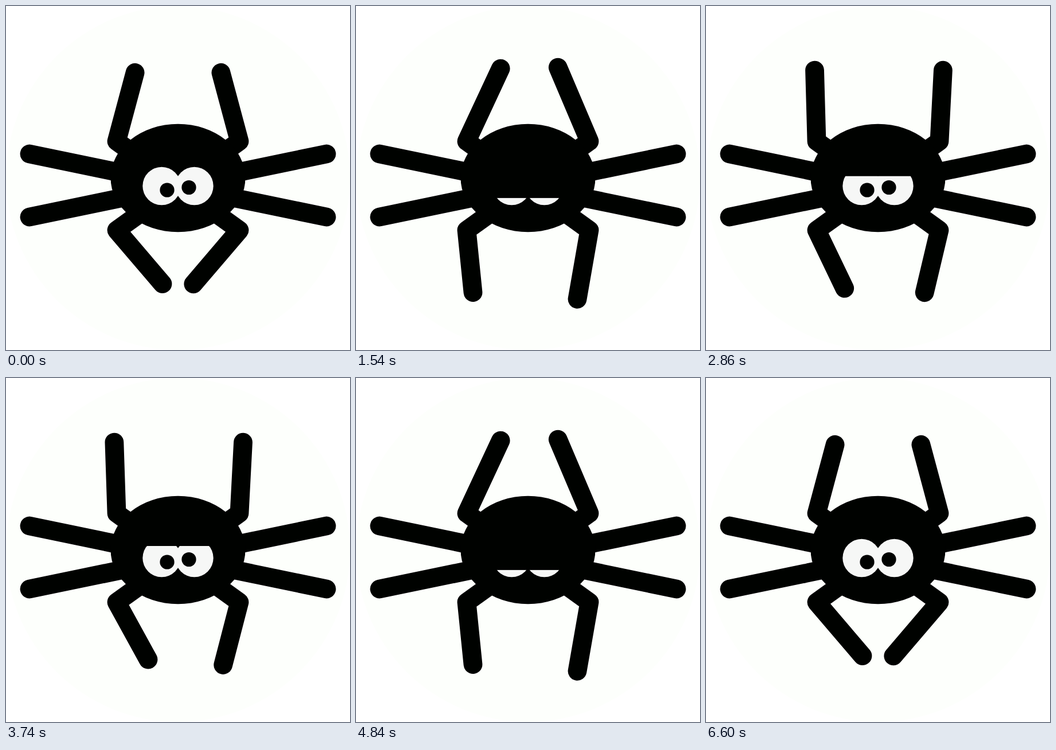
Recreate the animation shown at these times as an HTML page. Size 600x600 px, loop 6.82 s.

```html
<!DOCTYPE html>
<html lang="en">
<head>
<meta charset="utf-8">
<title>Sleepy spider</title>
<style>
html, body { margin: 0; width: 100%; height: 100%; overflow: hidden; background: #fff; }
svg { display: block; width: 100vw; height: 100vh; }
</style>
</head>
<body>
<svg viewBox="0 0 600 600">
  <circle cx="300" cy="300" r="300" fill="#fdfffc"/>
  <g fill="none" stroke="#000200" stroke-width="32.8" stroke-linecap="round" stroke-linejoin="round">
    <path d="M41 258L300 311.7L559 258M41 368L300 314.5L559 368"/>
    <path id="legs"/>
  </g>
  <ellipse cx="300" cy="300" rx="117.5" ry="94.2" fill="#000200"/>
  <g fill="#f6f7f6">
    <circle cx="271.5" cy="314" r="33.2"/>
    <circle cx="328.5" cy="314" r="33.2"/>
  </g>
  <g fill="#000200">
    <circle cx="281" cy="321" r="12.6"/>
    <circle cx="319" cy="316.5" r="12.6"/>
    <rect id="lid" x="230" y="260" width="140" height="18"/>
  </g>
</svg>
<script>
const STEP = 220, STEPS = 31, CYCLE = 15;
const MID = 300, RAD = Math.PI / 180;
const legPath = document.getElementById('legs');
const lid = document.getElementById('lid');

const bowl = (base, gain, low) => p => base + gain * (p - low) ** 2;
const reach = p => 124 + 2 * Math.max(0, p - 5) ** 3;

// side: -1 left, 1 right; dir: -1 up, 1 down
// turns: inward tilt of the shin in degrees at each key phase
const keys = [0, 2, 4, 5, 7, 8];
const legs = [
  { side: -1, dir: -1, size: reach, turns: [15, -1.9, -0.7, 4.2, 25, 28] },
  { side: 1, dir: -1, size: reach, turns: [15, -3, -2.8, 13.7, 23, 26] },
  { side: -1, dir: 1, size: bowl(108, 0.5, 5.5), turns: [40.5, 28.8, 16.2, 31, 5.8, 3] },
  { side: 1, dir: 1, size: bowl(110.5, 1, 3.6), turns: [40.5, 14.5, 9.9, 26.8, 9.9, 22] }
];

function mix(values, p) {
  const i = Math.max(1, keys.findIndex(k => k >= p));
  const k = (p - keys[i - 1]) / (keys[i] - keys[i - 1]);
  return values[i - 1] + (values[i] - values[i - 1]) * k;
}

// Out to phase 8, back again, with a quicker last stretch
function phaseAt(n) {
  if (n <= 8) return n;
  return n <= 11 ? 16 - n : (CYCLE - n) * 1.25;
}

function legAt({ side, dir, size, turns }, p) {
  const angle = mix(turns, p) * RAD, len = size(p);
  const kneeX = MID + side * 107, kneeY = 313.5 + dir * 77.5;
  const footX = kneeX - side * len * Math.sin(angle);
  const footY = kneeY + dir * len * Math.cos(angle);
  return `M${MID + side * 50} ${kneeY - dir * 41}L${kneeX} ${kneeY}L${footX} ${footY}`;
}

function draw(ms) {
  const step = Math.floor(ms / STEP) % STEPS;
  const p = phaseAt(step % CYCLE);
  lid.setAttribute('height', 18 + 7.5 * p + 2.2 * Math.max(0, p - 5));
  legPath.setAttribute('d', legs.map(leg => legAt(leg, p)).join(''));
}

const start = performance.now();
function tick() {
  draw(performance.now() - start);
  requestAnimationFrame(tick);
}
tick();
</script>
</body>
</html>
```
